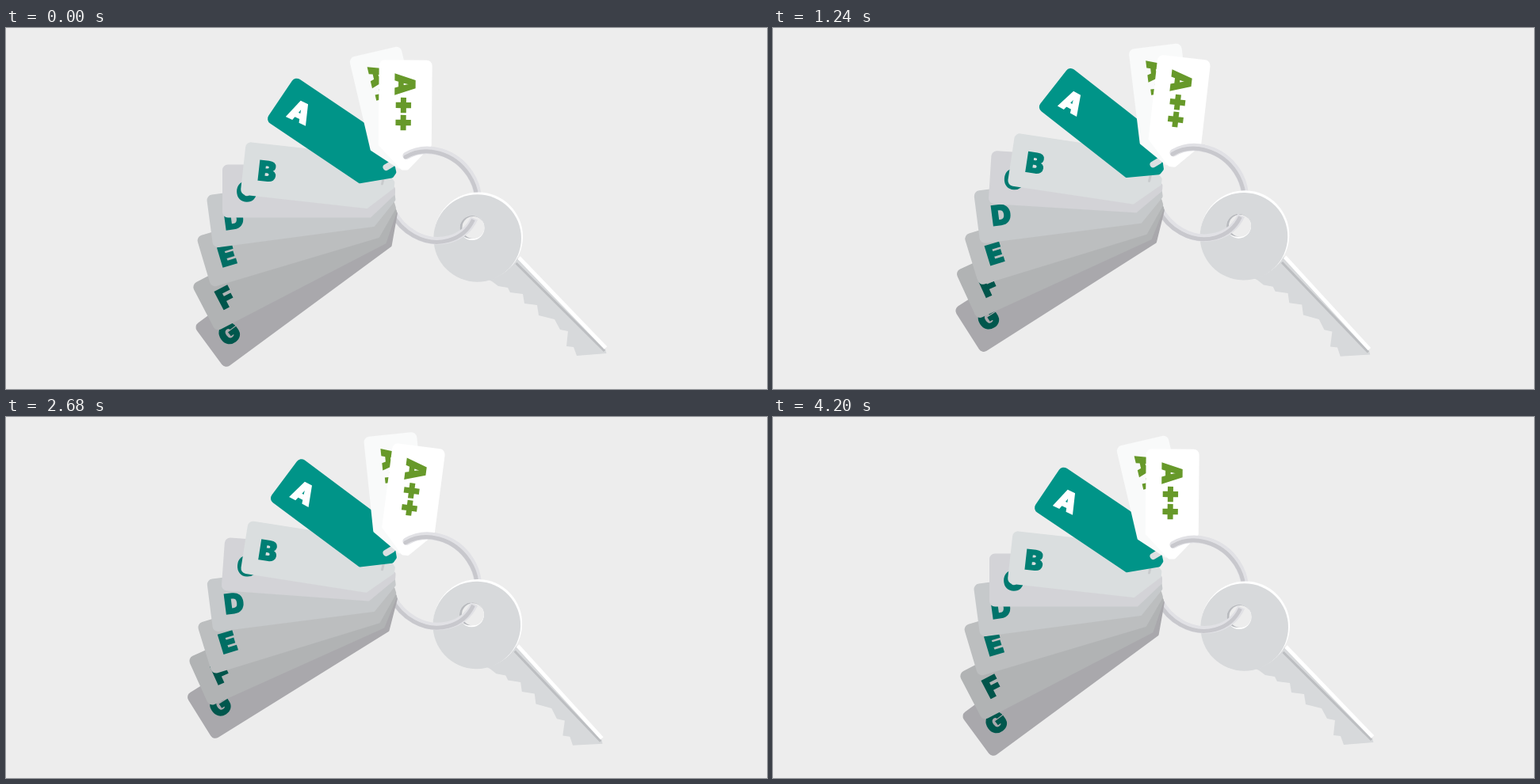
An HTML page with a canvas for the animation above (4240 ms loop, 960 px wide and 456 px high).

```html
<!DOCTYPE html>
<html lang="en">
<head>
<meta charset="utf-8">
<title>Key ring with rating tags</title>
<style>
html, body { margin: 0; width: 100%; height: 100%; overflow: hidden; background: #ededed; }
canvas { display: block; width: 960px; height: 456px; }
</style>
</head>
<body>
<canvas id="stage" width="960" height="456"></canvas>
<script>
const ctx = document.getElementById('stage').getContext('2d');
const LOOP = 4240, SPAN = 4200, STEP = 40;
const RAD = Math.PI / 180;
const HALF = 33.5, CHAMFER = 31, NOSE = 4;

const times = [0, 640, 1240, 2240, 3080, 3560];
const lift = [0, .31, .73, 1, .61, .27];
const bounce = [34, 37.8, 38.1, 35.2, 37.7, 32.7];

// Drawn from back to front; swing gives the angle at rest and fully lifted.
const tags = [
  { text: 'G', x: 491.6, y: 230.4, len: 292, swing: [-36.4, -31.1], fill: '#a9a8ac', ink: '#00574d' },
  { text: 'F', x: 491.5, y: 228, len: 273, swing: [-27.5, -23.6], fill: '#b1b3b4', ink: '#00554b' },
  { text: 'E', x: 491, y: 223.8, len: 252, swing: [-16.6, -17.2], fill: '#bcbebf', ink: '#006e64' },
  { text: 'D', x: 491, y: 213.5, len: 236, swing: [-7.6, -7.2], fill: '#c6c9cb', ink: '#00736a' },
  { text: 'C', x: 491, y: 206, len: 218, swing: [0, 4.9], fill: '#d3d3d7', ink: '#007a70' },
  { text: 'B', x: 490, y: 198.3, len: 192, swing: [6.4, 9.4], fill: '#dadedf', ink: '#007f74' },
  { text: 'A', x: 490.3, y: 186, len: 174, path: bounce, tilt: -9, fill: '#009488', ink: '#fff' },
  { text: 'A+', x: 499.5, y: 177, len: 151, swing: [76.8, 85.4], fill: '#f9fafa', ink: '#67992a' },
  { text: 'A++', x: 503, y: 179.5, len: 139, swing: [90.5, 98.7], fill: '#fff', ink: '#67992a' }
];

// Smooth periodic curve through the given values.
function curve(values, t) {
  const n = times.length;
  const at = i => times[(i + n) % n] + SPAN * Math.floor(i / n);
  const val = i => values[(i + n) % n];
  const slope = i => (val(i + 1) - val(i - 1)) / (at(i + 1) - at(i - 1));
  let i = n - 1;
  while (t < times[i]) i--;
  const d = at(i + 1) - at(i), p = (t - at(i)) / d, q = 1 - p;
  return q * q * (1 + 2 * p) * val(i) + p * p * (3 - 2 * p) * val(i + 1)
    + d * p * q * (q * slope(i) - p * slope(i + 1));
}

function poly(points, fill) {
  ctx.beginPath();
  points.forEach(([x, y]) => ctx.lineTo(x, y));
  ctx.closePath();
  ctx.fillStyle = fill;
  ctx.fill();
}

function disc(x, y, r, fill) {
  ctx.beginPath();
  ctx.arc(x, y, r, 0, 7);
  ctx.fillStyle = fill;
  ctx.fill();
}

function line(x1, y1, x2, y2, width, color) {
  ctx.beginPath();
  ctx.moveTo(x1, y1);
  ctx.lineTo(x2, y2);
  ctx.lineWidth = width;
  ctx.strokeStyle = color;
  ctx.stroke();
}

// Extra-heavy glyph, centred on x.
function glyph(char, x, base, size, weight) {
  ctx.font = `900 ${size}px Inter, Lato, "Open Sans", sans-serif`;
  ctx.lineWidth = weight;
  ctx.fillText(char, x, base);
  ctx.strokeText(char, x, base);
}

function tag(item, u, t) {
  const { len, swing, text } = item;
  const angle = item.path ? curve(item.path, t) : swing[0] + (swing[1] - swing[0]) * u;
  ctx.save();
  ctx.translate(item.x + u * .4, item.y - 5.6 * u);
  ctx.rotate(angle * RAD);
  ctx.beginPath();
  ctx.moveTo(-len / 2, -HALF);
  ctx.arcTo(-len, -HALF, -len, 0, 7);
  ctx.arcTo(-len, HALF, -len / 2, HALF, 7);
  ctx.arcTo(-CHAMFER, HALF, 0, NOSE, 2);
  ctx.arcTo(0, NOSE, 0, -NOSE, 3);
  ctx.arcTo(0, -NOSE, -CHAMFER, -HALF, 3);
  ctx.arcTo(-CHAMFER, -HALF, -len / 2, -HALF, 2);
  ctx.closePath();
  ctx.fillStyle = item.fill;
  ctx.fill();

  ctx.fillStyle = ctx.strokeStyle = item.ink;
  ctx.textAlign = 'center';
  ctx.lineJoin = 'miter';
  ctx.miterLimit = 3;
  ctx.translate(30.5 - len, .5);
  ctx.rotate((item.tilt || 0) * RAD);
  glyph(text[0], 0, 12.3, 34, 1.6);
  for (let i = 1; i < text.length; i++) glyph('+', 4.5 + 22 * i, 11.5, 33, 2);
  ctx.restore();
}

function ring(u, from, to) {
  const y = 211.5 - 5 * u;
  const arc = (dx, dy, width, color) => {
    ctx.beginPath();
    ctx.ellipse(538.3 + dx, y + dy, 60.5, 53.7, 45 * RAD, from * RAD, to * RAD);
    ctx.lineWidth = width;
    ctx.strokeStyle = color;
    ctx.stroke();
  };
  arc(0, 0, 9.5, '#e1e1e5');
  arc(-1.2, 1.6, 5, '#c8c8cd');
}

function key(u) {
  ctx.save();
  ctx.translate(595.5 - u, 264 - 3 * u);
  ctx.rotate(1.85 * u * RAD);
  ctx.translate(-595.5, -264);
  poly([[640, 284], [755, 402], [757.5, 411], [720, 414], [716, 403], [707, 402],
    [709, 383], [699, 381], [692, 368], [672, 363], [670, 350], [654, 348],
    [652, 336], [636, 334], [633, 328], [621, 326], [613, 320], [604, 316]], '#d7d9db');
  line(643.5, 297, 755, 408, 3, '#bcbec1');
  line(647, 290, 756.5, 404, 4.8, '#fff');
  disc(596, 263.5, 56, '#fff');
  disc(594.7, 265.5, 55.3, '#d7d9db');
  disc(588, 252.5, 15.5, '#fff');
  ctx.save();
  ctx.beginPath();
  ctx.arc(588, 252.5, 15.5, 0, 7);
  ctx.clip();
  disc(586.5, 250.5, 15.5, '#b8babe');
  disc(589.5, 252, 14, '#ededed');
  ctx.restore();
  ctx.restore();
}

function draw(t) {
  const u = curve(lift, t);
  ctx.fillStyle = '#ededed';
  ctx.fillRect(0, 0, 960, 456);
  ctx.lineCap = 'butt';
  ring(u, 193, 340);
  key(u);
  ring(u, -18, 150);
  ctx.lineCap = 'round';
  for (const item of tags) {
    // The ring shows through the hole of the coloured tag.
    if (item.text === 'A+') line(487, 171.5 - 5 * u, 479.5, 176 - 5 * u, 8, '#dcdfe1');
    tag(item, u, t);
    if (item.text === 'B') line(477, 187 - 5 * u, 474.5, 197 - 5 * u, 3, '#c8cbcd');
  }
  // Only the ring's upper left end lies in front of the tags.
  ctx.save();
  ctx.beginPath();
  ctx.rect(0, 0, 545, 456);
  ctx.clip();
  ring(u, 193, 340);
  ctx.restore();
}

function tick(now) {
  const t = Math.floor((now % LOOP) / STEP) * STEP;
  draw(t % SPAN);
  requestAnimationFrame(tick);
}
draw(0);
requestAnimationFrame(tick);
</script>
</body>
</html>
```
